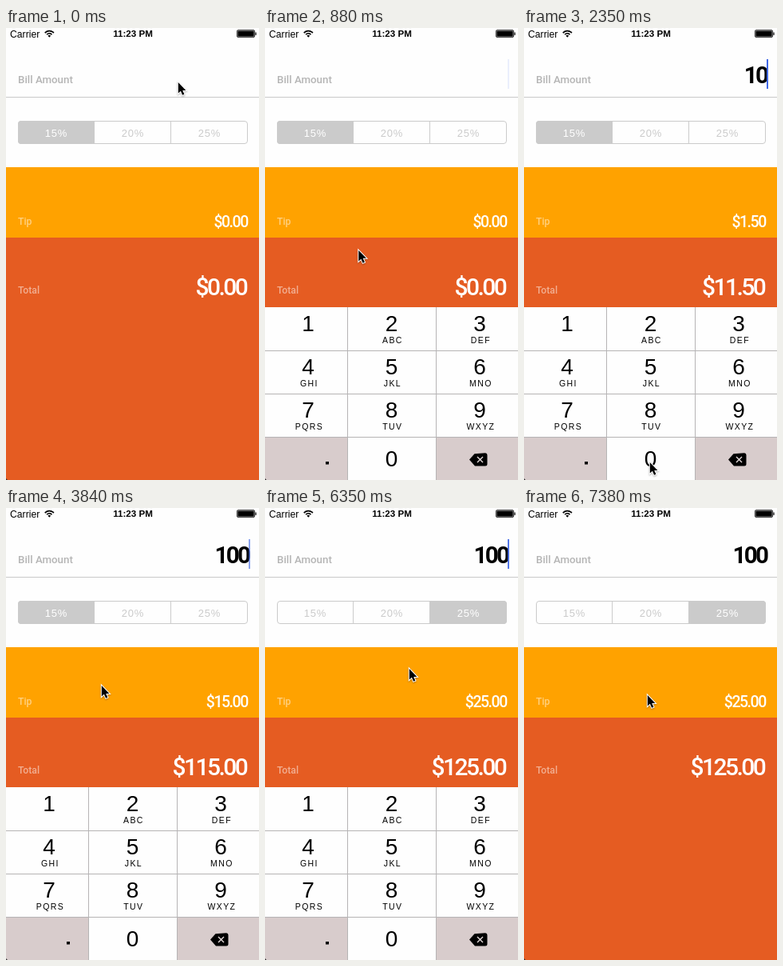
Write an HTML page with a canvas that moves like this. It is 317 px wide and 565 px high and loops after 8000 ms.

```html
<!DOCTYPE html>
<html lang="en">
<head>
<meta charset="utf-8">
<title>Tip calculator</title>
<style>
  html, body { margin: 0; width: 100%; height: 100%; overflow: hidden; background: #fefefe; }
  canvas { display: block; width: 317px; height: 565px; }
</style>
</head>
<body>
<canvas id="stage"></canvas>
<script>
const W = 317, H = 565, LOOP = 8000;
const TICK = 147.6;              // the screen refreshes in steps of this many ms
const KEYS_TOP = 349, ROW = 54;
const SANS = '"Liberation Sans", Arial, sans-serif';
const DIN = 'Roboto, sans-serif';
const GREY = '#cbcbcb', INK = '#000';

const canvas = document.getElementById('stage');
const ctx = canvas.getContext('2d');
const dpr = window.devicePixelRatio || 1;
canvas.width = Math.round(W * dpr);
canvas.height = Math.round(H * dpr);

// pointer stops: tick, x, y
const PATH = [
  [3, 215, 67], [8, 63, 391], [10, 63, 391], [15, 157, 542], [18, 157, 542],
  [24, 119, 221], [26, 119, 221], [30, 139, 138], [33, 139, 138], [37, 236, 131],
  [40, 236, 131], [43, 180, 200], [46, 154, 233]
];
// value from a tick onwards
const AMOUNTS = [[0, 0], [10, 1], [16, 10], [18, 100]];
const RATES = [[0, 15], [32, 20], [40, 25]];
const PRESSED = { 9: '1', 15: '0' };
const BLINK = [0.6, 0.1, 0, 0.9, 1, 1, 1];
const KEYS = [
  ['1', ''], ['2', 'ABC'], ['3', 'DEF'],
  ['4', 'GHI'], ['5', 'JKL'], ['6', 'MNO'],
  ['7', 'PQRS'], ['8', 'TUV'], ['9', 'WXYZ']
];
const KEY_X = [0, 103, 214, W], KEY_MID = [54, 158.5, 269];

const latest = (list, k) => list.filter(e => e[0] <= k).pop()[1];
const mod = (a, n) => ((a % n) + n) % n;

function rect(x, y, w, h, color) {
  ctx.fillStyle = color;
  ctx.fillRect(x, y, w, h);
}

function poly(points) {
  ctx.beginPath();
  points.forEach(([x, y]) => ctx.lineTo(x, y));
  ctx.closePath();
}

function label(str, x, y, font, color, align = 'left', spacing = 0) {
  ctx.font = font;
  ctx.fillStyle = color;
  ctx.textAlign = align;
  ctx.letterSpacing = spacing + 'px';
  ctx.fillText(str, align === 'center' ? x + spacing / 2 : x, y);
  ctx.letterSpacing = '0px';
}

// right-aligned figures, tracked so that one digit takes `advance`
function figures(str, right, y, weight, size, advance, color) {
  ctx.font = `${weight} condensed ${size}px ${DIN}`;
  ctx.fillStyle = color;
  ctx.textAlign = 'center';
  const tracking = advance - ctx.measureText('0').width;
  for (const c of [...str].reverse()) {
    const w = ctx.measureText(c).width + tracking;
    ctx.fillText(c, right - w / 2, y);
    right -= w;
  }
}

function pointerAt(k) {
  let a = PATH[0];
  for (const b of PATH) {
    if (k <= b[0]) {
      const u = b === a ? 0 : Math.max(0, (k - a[0]) / (b[0] - a[0]));
      const e = u * u * (3 - 2 * u);
      return [a[1] + (b[1] - a[1]) * e, a[2] + (b[2] - a[2]) * e];
    }
    a = b;
  }
  return [a[1], a[2]];
}

// critically damped spring: 1 at the start, settling to 0
function spring(ms) {
  const s = Math.max(0, ms) * 0.016;
  return (1 + s) * Math.exp(-s);
}

function keyboardOffset(t) {
  const travel = H - KEYS_TOP;
  return Math.round(travel * (t < 6845 ? spring(t - 20) : 1 - spring(t - 6845)));
}

function statusBar() {
  label('Carrier', 5, 11.5, '12.2px ' + SANS, INK);
  label('11:23 PM', 159, 11, 'bold 11.6px ' + SANS, INK, 'center');
  ctx.strokeStyle = INK;
  ctx.lineWidth = 1.6;
  for (const r of [4.2, 7.4]) {
    ctx.beginPath();
    ctx.arc(54.3, 11, r, -Math.PI * 0.77, -Math.PI * 0.23);
    ctx.stroke();
  }
  ctx.fillStyle = INK;
  ctx.beginPath();
  ctx.moveTo(54.3, 11.8);
  ctx.arc(54.3, 11, 2.2, -Math.PI * 0.8, -Math.PI * 0.2);
  ctx.fill();

  ctx.lineWidth = 0.8;
  ctx.beginPath();
  ctx.roundRect(289.4, 2.6, 22.2, 9, 1.6);
  ctx.stroke();
  rect(290.3, 3.5, 20.4, 7.2, INK);
  rect(312.4, 5.5, 1.2, 3.4, INK);
}

function segments(rate) {
  const edges = [15, 110, 206, 303];
  ctx.save();
  ctx.beginPath();
  ctx.roundRect(15, 116, 288, 29, 4);
  ctx.clip();
  [15, 20, 25].forEach((value, i) => {
    const on = value === rate, x = edges[i];
    if (on) rect(x, 116, edges[i + 1] - x + 1, 29, GREY);
    if (i) rect(x, 116, 1, 29, GREY);
    label(value + '%', [62.5, 158.5, 254.5][i], 135.5, '13px ' + SANS,
      on ? '#fff' : GREY, 'center', 0.7);
  });
  ctx.restore();
  ctx.strokeStyle = GREY;
  ctx.lineWidth = 1;
  ctx.beginPath();
  ctx.roundRect(15.5, 116.5, 287, 28, 3.5);
  ctx.stroke();
}

function backspace() {
  const y = KEYS_TOP + 3 * ROW + 28.5;
  ctx.fillStyle = INK;
  ctx.beginPath();
  ctx.moveTo(256, y);
  ctx.lineTo(262.5, y - 7.3);
  ctx.arcTo(278.5, y - 8.5, 278.5, y, 2.5);
  ctx.arcTo(278.5, y + 8, 263, y + 8, 2.5);
  ctx.lineTo(263, y + 8);
  ctx.closePath();
  ctx.fill();
  ctx.strokeStyle = '#e6dcdc';
  ctx.lineWidth = 1.4;
  ctx.beginPath();
  for (const d of [-1, 1]) {
    ctx.moveTo(266, y - 3.5 * d);
    ctx.lineTo(273, y + 3.5 * d);
  }
  ctx.stroke();
}

function keyboard(offset, pressed) {
  const shade = '#d8cccc', line = '#b6b4b5';
  const bottom = KEYS_TOP + 3 * ROW;
  ctx.save();
  ctx.translate(0, offset);
  rect(0, KEYS_TOP, W, H - KEYS_TOP, '#fefefe');
  rect(0, bottom, 103, ROW, shade);
  rect(214, bottom, 103, ROW, shade);
  if (pressed === '1') rect(0, KEYS_TOP, 103, ROW, shade);
  if (pressed === '0') rect(103, bottom, 111, ROW, shade);
  for (let r = 1; r < 4; r++) rect(0, KEYS_TOP + r * ROW, W, 1, line);
  for (const x of KEY_X.slice(1, 3)) rect(x, KEYS_TOP, 1, H - KEYS_TOP, line);

  KEYS.forEach(([digit, letters], i) => {
    const x = KEY_MID[i % 3], y = KEYS_TOP + Math.floor(i / 3) * ROW;
    label(digit, x, y + 30, '28px ' + SANS, INK, 'center');
    label(letters, x + 0.7, y + 45, '10.5px ' + SANS, INK, 'center', 1.4);
  });
  label('0', KEY_MID[1], bottom + 37, '28px ' + SANS, INK, 'center');
  rect(76, bottom + 31, 4, 3.5, INK);
  backspace();
  ctx.restore();
}

function pointer(x, y) {
  ctx.save();
  ctx.translate(x + 0.8, y + 1);
  poly([[0, 0], [0, 13.6], [3.1, 10.7], [5.3, 15.8], [7.6, 14.8], [5.4, 9.9], [9.6, 9.9]]);
  ctx.shadowColor = 'rgba(0,0,0,.3)';
  ctx.shadowBlur = 2 * dpr;
  ctx.shadowOffsetY = dpr;
  ctx.strokeStyle = '#fff';
  ctx.lineWidth = 2;
  ctx.stroke();
  ctx.shadowColor = 'transparent';
  ctx.fillStyle = INK;
  ctx.fill();
  ctx.restore();
}

function draw(now) {
  const k = Math.floor((now % LOOP + 12) / TICK);
  const t = k * TICK;
  const amount = latest(AMOUNTS, k), rate = latest(RATES, k);
  const tip = amount * rate / 100;
  const money = v => '$' + v.toFixed(2);

  ctx.setTransform(dpr, 0, 0, dpr, 0, 0);
  rect(0, 0, W, H, '#fefefe');
  statusBar();

  label('Bill Amount', 15, 68.5, '500 13.3px ' + DIN, '#b5b5b5');
  if (amount) figures(String(amount), 305.5, 69, 700, 29.5, 14.2, INK);
  if (k >= 1 && k < 47) {
    ctx.globalAlpha = BLINK[mod(k - 26, 7)];
    rect(304, 39, 2, 37, '#4169e6');
    ctx.globalAlpha = 1;
  }
  rect(0, 86, W, 1, '#c9c9c9');
  segments(rate);

  rect(0, 174, W, 88, '#ffa200');
  rect(0, 262, W, H - 262, '#e55c22');
  const faint = 'rgba(255,255,255,.5)';
  label('Tip', 15, 245.5, '500 12.3px ' + DIN, faint);
  label('Total', 15, 331.5, '500 12.3px ' + DIN, faint);
  figures(money(tip), 303.5, 249, 500, 19.5, 9.6, '#fff');
  figures(money(amount + tip), 302.5, 334, 500, 30, 14.5, '#fff');

  const offset = keyboardOffset(t);
  if (offset < H - KEYS_TOP) keyboard(offset, PRESSED[k]);

  ctx.fillStyle = '#333';
  poly([[0, H - 2], [2, H], [0, H]]);
  ctx.fill();
  pointer(...pointerAt(k));
}

const start = performance.now();
function loop() {
  draw(performance.now() - start);
  requestAnimationFrame(loop);
}
loop();
</script>
</body>
</html>
```
